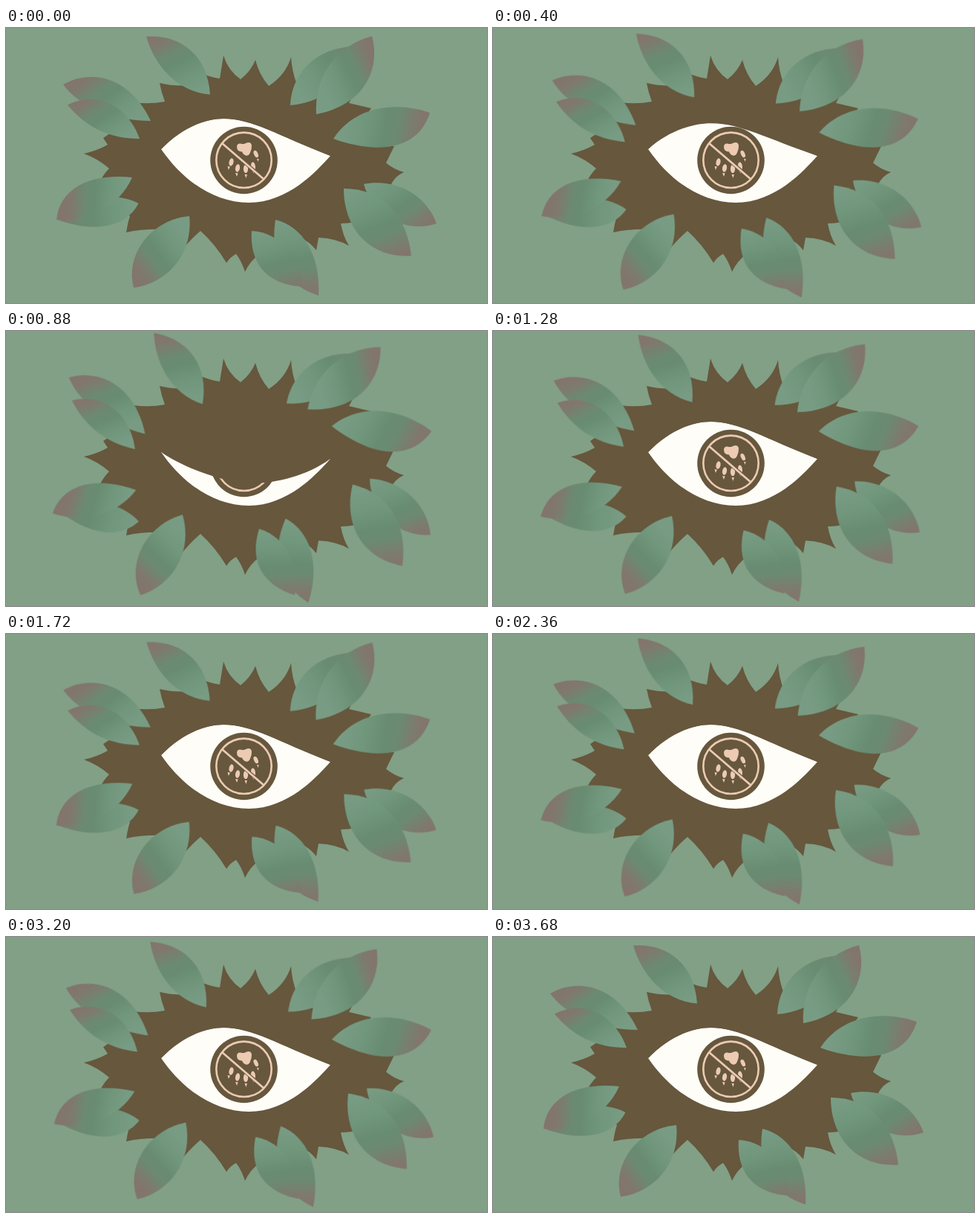
These frames come from a looping animation (648 px wide and 370 px high, 3.84 s). An HTML page:

```html
<!DOCTYPE html>
<html lang="en">
<head>
<meta charset="utf-8">
<title>Eye in the leaves</title>
<style>
  html, body { margin: 0; width: 100%; height: 100%; overflow: hidden; background: #81a086; }
  svg { display: block; width: 648px; height: 370px; }
  .leaf { animation: sway 3840ms cubic-bezier(.37, 0, .63, 1) infinite; }
  .lid { animation: blink 3840ms cubic-bezier(.37, 0, .63, 1) infinite; }

  /* two swings, then a short rest */
  @keyframes sway {
    0%, 47.917%, 95.833%, 100% { transform: rotate(0deg); }
    23.958%, 71.875% { transform: rotate(var(--swing)); }
  }
  @keyframes blink {
    0%, 8.854%, 29.69%, 100% {
      d: path("M209 163C236 135 267 122 293 122C332 122 365 144 437 172L437 110L209 110Z");
    }
    19.27% {
      d: path("M209 163C241 203 296 230 327 235C356 240 412 220 437 172L437 110L209 110Z");
    }
  }
</style>
</head>
<body>
<svg viewBox="0 0 648 370" xmlns="http://www.w3.org/2000/svg">
  <defs id="defs"></defs>

  <path id="bush" fill="#66573d" d="M293 37Q299 57 316 69Q330 58 336 43Q341 63 354 78Q377 63 384 39
    Q385 58 392 76L440 84L468 90L462 101L492 108L480 125L496 158L523 159L512 181.500Q522 190 536 194
    Q524 199 518 212L490 256Q470 263 451 263Q454 280 462 293Q445 283 421 282L418 299Q409 288 400 284L380 300L342 304
    Q329 313 322 328Q317 313 310 304Q302 308 297 316Q282 291 262 273Q250 283 236 300L213 271
    Q185 270 162 275Q164 262 167 253L150 240L140 215L127 206Q131 197 139 189Q124 176 105 169
    Q123 165 137 157L131 148L165 125L172 100Q193 103 214 99Q209 86 207 74Q228 79 247 77L258 59Q274 66 288 68Z"/>

  <g id="eye">
    <path fill="#fffdf7" d="M209 163C236 135 267 122 293 122C332 122 365 144 437 172C418 193 380 235 327 235C280 235 238 205 209 163Z"/>
    <circle cx="320.500" cy="178" r="45.300" fill="#66573d"/>
    <g fill="#eccbb2">
      <path d="M311 160Q311 155 316 155.500Q320 157 324 154.500Q330 152.500 331 158Q331 163 329.500 166Q328 172.500 323 171.500Q319.500 170.500 318 166.500Q311 166 311 160Z"/>
      <ellipse cx="303.500" cy="180.500" rx="3" ry="5.200" transform="rotate(12 303.500 180.500)"/>
      <ellipse cx="312" cy="188.500" rx="3" ry="5.300" transform="rotate(10 312 188.500)"/>
      <ellipse cx="323" cy="189.500" rx="3.100" ry="5.800"/>
      <ellipse cx="333" cy="186" rx="2.900" ry="5.600" transform="rotate(-8 333 186)"/>
      <ellipse cx="336.700" cy="169.500" rx="2.700" ry="5" transform="rotate(-24 336.700 169.500)"/>
      <path d="M298.500 186l3.400 .6-2 4.400zM309 195l3.600 .5-1.600 4.400zM321.500 197l3.400 0-1.500 5zM331.500 192.500l3.200 0-1 3zM338 176l2.600 0-1 4z"/>
    </g>
    <g fill="none" stroke="#eccbb2" stroke-width="2.600">
      <path stroke="#66573d" stroke-width="4.600" d="M292 155L348 204"/>
      <path stroke-width="2.800" d="M291 155L348 204"/>
      <circle cx="320.500" cy="177.800" r="37.200"/>
    </g>
    <path class="lid" fill="#66573d" d="M209 163C236 135 267 122 293 122C332 122 365 144 437 172L437 110L209 110Z"/>
  </g>

  <g id="leaves"></g>
</svg>

<script>
  // outline, shading line from tip to base, pivot, swing in degrees
  const leaves = [
    ["M189 11.500C230 8 271 32 275 89.500C230 86 200 50 189 11.500Z", "205 8 245 92", "232 50.500", 13.4],
    ["M77 76C118 53 168 68 195 125C150 125 100 108 77 76Z", "108 60 158 130", "136 100.500", 14],
    ["M83 103.500C120 84 163 102 180 149C140 149 108 134 83 103.500Z", "108 90 150 154", "131.500 125.500", 12.5],
    ["M178.500 236C160 272 112 274 70 258C95 225 150 220 178.500 236Z", "62 252 172 246", "121 247", 20],
    ["M68 258C72 215 115 195 170 201C150 245 105 262 68 258Z", "78 226 160 230", "118.500 229.500", 13.7],
    ["M172 349.500C160 305 195 258 247 253C252 300 222 342 172 349.500Z", "170 328 240 278", "210 301", -10.3],
    ["M363 258C403 268 424 310 421 360C375 345 355 310 363 258Z", "402 362 388 260", "392 309", 14.6],
    ["M331 273C370 275 398 310 399 348C350 345 328 315 331 273Z", "382 360 356 270", "364 311", 14],
    ["M482 210C522 202 565 222 580 263C545 276 495 258 482 210Z", "562 275 508 197", "531 236.700", 14.4],
    ["M455 216C505 216 540 250 546 306.500C490 310 455 270 455 216Z", "528 315 484 214", "500.500 261.300", 13.7],
    ["M441 149C468 108 520 97 571 114C555 165 500 170 441 149Z", "566 138 458 120", "506.500 131.500", 18],
    ["M383 104C385 55 425 25 470 25C465 70 430 100 383 104Z", "490 25 395 88", "427 64.500", 8],
    ["M493 11C506 60 478 105 418 116C415 70 440 25 493 11Z", "500 42 424 78", "455.500 63.500", 14]
  ];
  const stops = [["0", "#82756c"], [".12", "#80786d"], [".36", "#6b8a71"], [".5", "#688c71"], [".75", "#70967c"], ["1", "#789c83"]];

  function add(parent, tag, attrs) {
    const el = document.createElementNS("http://www.w3.org/2000/svg", tag);
    for (const key in attrs) el.setAttribute(key, attrs[key]);
    return parent.appendChild(el);
  }

  const defs = document.getElementById("defs");
  const group = document.getElementById("leaves");
  leaves.forEach(([d, line, pivot, swing], i) => {
    const [x1, y1, x2, y2] = line.split(" ");
    const [px, py] = pivot.split(" ");
    const shade = add(defs, "linearGradient", { id: "shade" + i, gradientUnits: "userSpaceOnUse", x1, y1, x2, y2 });
    for (const [offset, color] of stops) add(shade, "stop", { offset, "stop-color": color });
    add(group, "path", {
      d, class: "leaf", fill: `url(#shade${i})`,
      style: `transform-origin:${px}px ${py}px;--swing:${swing}deg`
    });
  });
</script>
</body>
</html>
```
